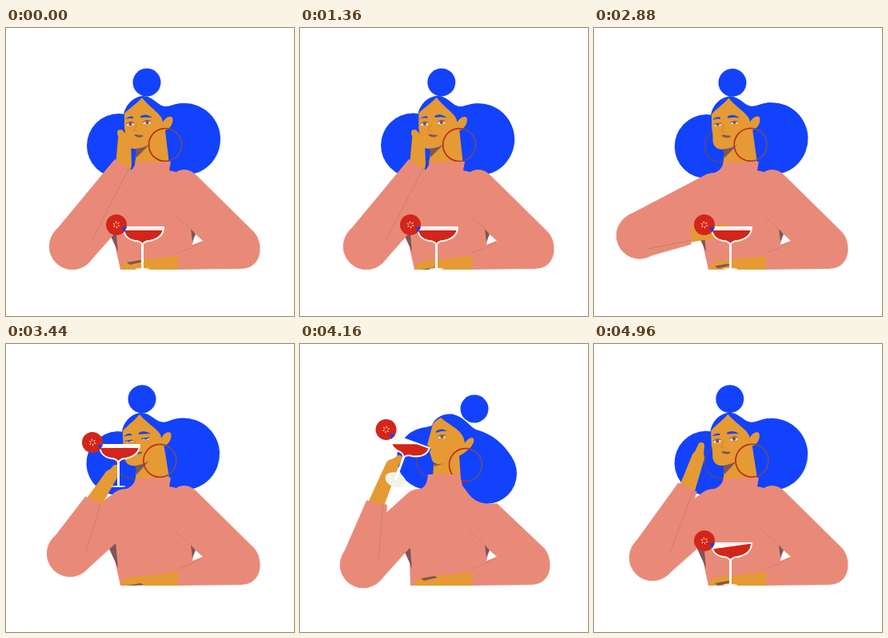
An HTML page with a canvas for the animation above (5.04 s loop, 360 by 360 pixels).

```html
<!DOCTYPE html>
<html lang="en">
<head>
<meta charset="utf-8">
<title>Evening drink</title>
<style>
  html, body { margin: 0; width: 100%; height: 100%; overflow: hidden; background: #fff; }
  canvas { display: block; width: 360px; height: 360px; }
</style>
</head>
<body>
<canvas id="stage" width="360" height="360"></canvas>
<script>
const ctx = document.getElementById('stage').getContext('2d');
const LOOP = 5040, STEP = 80;
const BLUE = '#1342fc', SKIN = '#e59a33', SWEATER = '#e98a79', SHADE = '#805558',
      RED = '#d32519', SEAM = '#bf8269', WHITE = '#fffdf8';

// Arm poses: elbow, wrist, palm, fingertip offset (x, y each)
const CHEEK = [83, 273, 147, 171, 148, 140, -5, -9];
const LEAVE = [73, 267, 117, 179, 130, 142, 4, -15];
const GRAB  = [54, 258, 122, 272, 160, 275, 8, -4];
const LIFT  = [80, 262, 111, 196, 131, 165, 6, -10];
const SIP   = [79, 276, 96, 198, 115, 152, 9, -9];

const armKeys = [[0, ...CHEEK], [2320, ...CHEEK], [2640, ...LEAVE], [2960, ...GRAB], [3440, ...LIFT],
  [3920, ...SIP], [4400, ...SIP], [4720, ...GRAB], [4960, ...LEAVE], [LOOP, ...CHEEK]];

// time, rim x, rim y, tilt, slosh
const glassKeys = [[0, 197, 249, 0, 0], [2960, 197, 249, 0, 0], [3440, 167, 126, 0, 0],
  [3920, 162, 130, 20, 0], [4400, 162, 130, 20, 0], [4720, 197, 249, 0, 0],
  [4960, 197, 249, 0, -8], [LOOP, 197, 249, 0, 0]];

// time, tilt, bun offset, earring offset, turn to profile, lowered lids
const headKeys = [[0, 0, 0, 0, 0, 0], [240, 0, 0, 0, 0, 0], [800, -5, -7, 0, 0, 0],
  [1360, .5, 0, 0, 0, 0], [2320, 0, 0, 0, 0, 0], [3440, -2.5, -2, -6, 0, .6],
  [3920, 0, 0, 0, 1, .1], [4480, 0, 0, 0, 1, .1], [4800, -2.5, -2, -2, 0, 0],
  [4960, -2, -3, -1, 0, 0], [LOOP, 0, 0, 0, 0, 0]];

const tapKeys = [[0, 0], [800, 7], [1360, 9], [2320, 0], [3440, 9], [4160, 0], [4960, 6], [LOOP, 0]];

const mix = (a, b, k) => a + (b - a) * k;
const rad = deg => deg * Math.PI / 180;

function track(keys, t) {
  const i = keys.findIndex(key => key[0] > t);
  const a = keys[i - 1], b = keys[i];
  const u = (t - a[0]) / (b[0] - a[0]), k = u * u * (3 - 2 * u);
  return a.slice(1).map((v, j) => mix(v, b[j + 1], k));
}

// Blend two path strings that share the same commands
function morph(a, b, k) {
  const target = b.match(/-?[\d.]+/g);
  let i = 0;
  return a.replace(/-?[\d.]+/g, n => mix(+n, +target[i++], k).toFixed(2));
}

function fill(path, color) {
  ctx.fillStyle = color;
  ctx.fill(new Path2D(path));
}

function line(path, color, width) {
  ctx.strokeStyle = color;
  ctx.lineWidth = width;
  ctx.stroke(new Path2D(path));
}

function oval(x, y, rx, color, ry = rx) {
  ctx.fillStyle = color;
  ctx.beginPath();
  ctx.ellipse(x, y, rx, ry, 0, 0, 7);
  ctx.fill();
}

function arc(x, y, r, from, to, color) {
  ctx.strokeStyle = color;
  ctx.lineWidth = 1.7;
  ctx.beginPath();
  ctx.arc(x, y, r, rad(from), rad(to));
  ctx.stroke();
}

// Tapered limb, round at the first end
function limb(x1, y1, r1, x2, y2, r2, color, roundTip) {
  const d = Math.hypot(x2 - x1, y2 - y1), nx = (y1 - y2) / d, ny = (x2 - x1) / d;
  oval(x1, y1, r1, color);
  if (roundTip) oval(x2, y2, r2, color);
  fill(`M${x1 + nx * r1} ${y1 + ny * r1}L${x2 + nx * r2} ${y2 + ny * r2}` +
       `L${x2 - nx * r2} ${y2 - ny * r2}L${x1 - nx * r1} ${y1 - ny * r1}Z`, color);
}

function drawEye(x, y, lid) {
  oval(x, y, 5, '#f6e6dc', 2.5 * (1 - lid));
  oval(x + .5, y, 2.2, SHADE, 2.4 * (1 - lid));
  line(`M${x - 5} ${y}Q${x} ${y - 4 + lid * 4} ${x + 5} ${y - 1}`, lid > .3 ? BLUE : SHADE, 1.2);
}

function drawHead([tilt, bunX, earX, turn, lid]) {
  const shape = (a, b, color) => fill(morph(a, b, turn), color);
  ctx.save();
  ctx.translate(190, 160);
  ctx.rotate(rad(tilt));
  ctx.translate(-190, -160);

  oval(mix(176 + bunX, 218, turn), mix(68, 81, turn), 17.5, BLUE);
  oval(mix(141, 160, turn), mix(147, 143, turn), mix(40, 39, turn), BLUE);
  oval(mix(223, 233, turn), mix(139, 162, turn), mix(45, 38, turn), BLUE);
  shape('M147 109C149 96 159 86 171 85C184 85 189 97 199 98C206 98 212 94 222 94L240 178L150 180L140 107Z',
        'M165 102C168 92 180 86 192 88C206 92 212 103 220 107C240 112 255 125 265 142L250 190L160 181L150 106Z', BLUE);
  arc(mix(159, 166, turn) + earX / 6, 147, 20, 0, 360, '#51478c');

  shape('M170 87C163 95 153 101 148 107L148 122L148 125L149 131L149 141C150 148 155 151 161 151L164 151L161 170L204 170L199 128C206 126 210 117 208 112C205 109 199 112 196 118C196 108 182 102 170 87Z',
        'M176 92C171 95 166 98 165 104L159 126L164 131L162 135L164 141C165 149 169 150 175 150L167 150L166 168L201 168L199 140C212 133 219 124 217 118C214 116 209 119 206 124C205 108 190 104 176 92Z', SKIN);
  shape('M162 151C170 150 176 148 180 145L163 162Z',
        'M167 150C175 151 181 149 187 147L168 153Z', SHADE);

  drawEye(mix(176, 177, turn), mix(118, 116, turn), lid);
  shape('M168 110Q175 106 183 112Q175 111 168 112Z', 'M170 109Q177 104 184 109Q177 108 170 111Z', BLUE);
  ctx.globalAlpha = 1 - turn;
  drawEye(mix(155, 166, turn), mix(120, 116, turn), lid);
  fill('M149 114Q154 109 159 111L159 113Q154 112 149 114Z', BLUE);
  line('M164 120L160 128L164 129', '#cd842b', 1);
  fill('M160 134Q163 132 166 134Q169 133 172 135Q166 139 160 134Z', SHADE);
  ctx.globalAlpha = 1;

  const x = mix(199, 207, turn) + earX, y = mix(146, 151, turn);
  arc(x, y, 20.5, 80, 280, '#b9301f');
  arc(x, y, 20.5, -80, 80, '#62507c');
  ctx.restore();
}

function drawBody(turn, tap) {
  fill(morph(
    'M162 168L206 167L204 178L213 180C222 174 232 178 238 184L309 254C322 266 323 301 293 301L215 302L143 302L137 275L136 240L120 215L148 182C155 180 160 176 162 168Z',
    'M160 163L200 163L203 177L212 189C221 199 232 201 246 199L304 254C317 266 318 301 288 301L215 302L138 302L137 275L138 240L120 215L148 182C155 180 159 176 160 163Z',
    turn), SWEATER);
  fill('M129 256L137 247L140 280Z', SHADE);
  fill('M236 257L246 266L233 271Z', '#fff');
  fill('M231 251L237 258L233 267Z', SHADE);
  line('M210 232L236 256M245 267Q232 276 215 281', SEAM, .8);
  fill('M215 284L190 288L163 290L148 293L143 302L215 302Z', SKIN);
  fill(`M151 ${293 + tap}L168 ${290 + tap}L172 ${292 + tap}L155 ${Math.min(302, 296 + tap)}Z`, SHADE);
}

function drawArm([ex, ey, wx, wy, px, py, fx, fy]) {
  const d = Math.hypot(wx - ex, wy - ey), nx = (ey - wy) / d, ny = (wx - ex) / d;
  limb(ex, ey, 29, 150, 205, 24, SWEATER, true);
  limb(wx, wy, 10, px, py, 8, SKIN, true);
  limb(px, py, 7, px + fx, py + fy, 4, SKIN, true);
  limb(ex, ey, 29, wx, wy, 13, SWEATER);
  const sx = mix(ex, wx, .15) + nx * 17, sy = mix(ey, wy, .15) + ny * 17;
  line(`M${wx + nx * 8} ${wy + ny * 8}L${sx} ${sy}`, SEAM, .9);
}

function drawGlass([x, y, tilt, slosh]) {
  const bowl = 'M-50 0C-50 12 -42 16 -36 17C-30 17 -28 19 -26.5 22C-25 19 -23 17 -17 17C-8 15 0 10 0 0Z';
  ctx.save();
  ctx.translate(x, y);
  ctx.rotate(rad(tilt));
  oval(-26.5, 52, 9 + tilt / 5, '#f3f3ee', 1 + tilt * .4);
  line('M-26.5 20V52', WHITE, 3);
  fill(bowl, WHITE);
  ctx.save();
  ctx.clip(new Path2D(bowl));
  ctx.translate(-25, 4);
  ctx.rotate(rad(slosh - tilt));
  fill('M-40 0H40V40H-40Z', RED);
  ctx.restore();
  line(bowl, WHITE, 2);

  oval(-59, -3, 13, RED);
  for (let i = 0; i < 6; i++) {
    const a = rad(i * 60 + 20), c = Math.cos(a), s = Math.sin(a);
    line(`M${-59 + c * 2} ${-3 + s * 2}L${-59 + c * 4.5} ${-3 + s * 4.5}`, '#f3c9b4', 1.2);
  }
  fill('M-53 0L-46 0L-49 6Z', BLUE);
  ctx.restore();
}

function draw() {
  const t = Math.floor(performance.now() % LOOP / STEP) * STEP;
  const head = track(headKeys, t);
  ctx.fillStyle = '#fff';
  ctx.fillRect(0, 0, 360, 360);
  drawHead(head);
  drawBody(head[3], track(tapKeys, t)[0]);
  drawArm(track(armKeys, t));
  drawGlass(track(glassKeys, t));
  requestAnimationFrame(draw);
}
draw();
</script>
</body>
</html>
```
